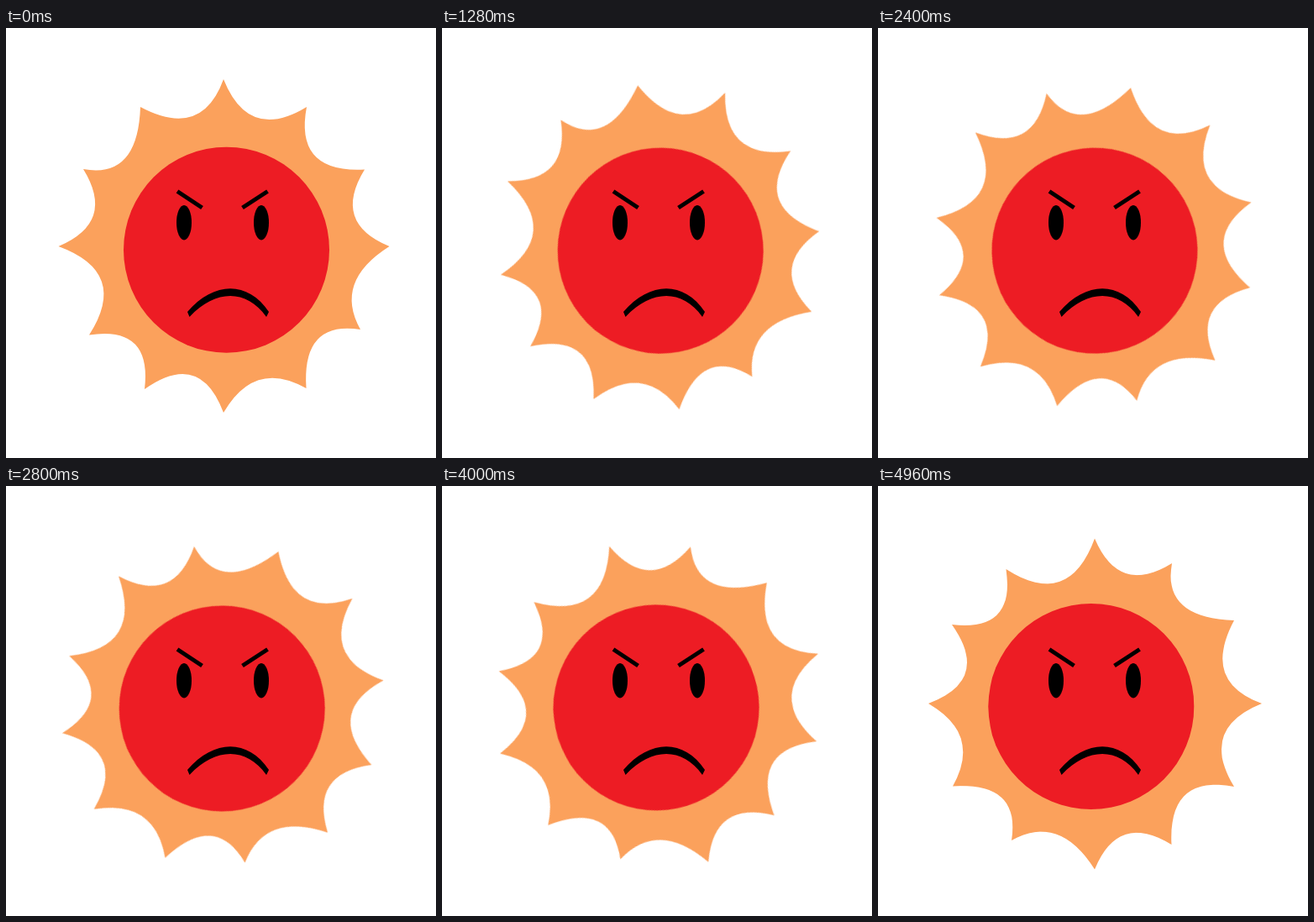
These frames come from a looping animation (512 px wide and 512 px high, 5000 ms). An HTML page:

```html
<!DOCTYPE html>
<html lang="en">
<head>
<meta charset="utf-8">
<title>Angry sun</title>
<style>
  html, body { margin: 0; width: 100%; height: 100%; overflow: hidden; background: #fff; }
  svg { display: block; width: 100%; height: 100%; }

  .sun {
    transform-origin: 259px 259px;
    animation: turn 5s steps(125, jump-none) infinite;
  }
  .eye {
    transform-box: fill-box;
    transform-origin: center;
    animation: blink 5s infinite;
  }
  .brows { fill: none; stroke: #000; stroke-width: 5; }

  @keyframes turn { to { transform: rotate(90deg); } }
  @keyframes blink {
    0%, 36%, 44%, 100% { transform: scaleY(1); animation-timing-function: steps(5); }
    40% { transform: scaleY(.09); animation-timing-function: steps(5); }
  }
</style>
</head>
<body>
<svg viewBox="0 0 512 512">
  <g class="sun">
    <path fill="#fba15c" d="M259 61
      Q289 136 358 94 Q343 173 427 168.5 Q388 232 456.5 260
      Q390 302 422 359 Q352 348 357.5 429 Q296 394 259 458
      Q231 383 165 430 Q174 354 99 365.5 Q147 291 62.5 260
      Q131 231 92 168 Q157 180 160 94 Q233 133 259 61Z"/>
    <circle cx="262.5" cy="264.2" r="122.5" fill="#ed1c24"/>
  </g>
  <path class="brows" d="M204 194.5L233.5 214M311.5 194.5L281.5 214"/>
  <ellipse class="eye" cx="212" cy="231.7" rx="9" ry="20.7"/>
  <ellipse class="eye" cx="304" cy="231.7" rx="9" ry="20.7"/>
  <path d="M216 338C248 301 288 301 313 338L310 344C286 310.7 250 310.7 218.5 344Z"/>
</svg>
</body>
</html>
```
